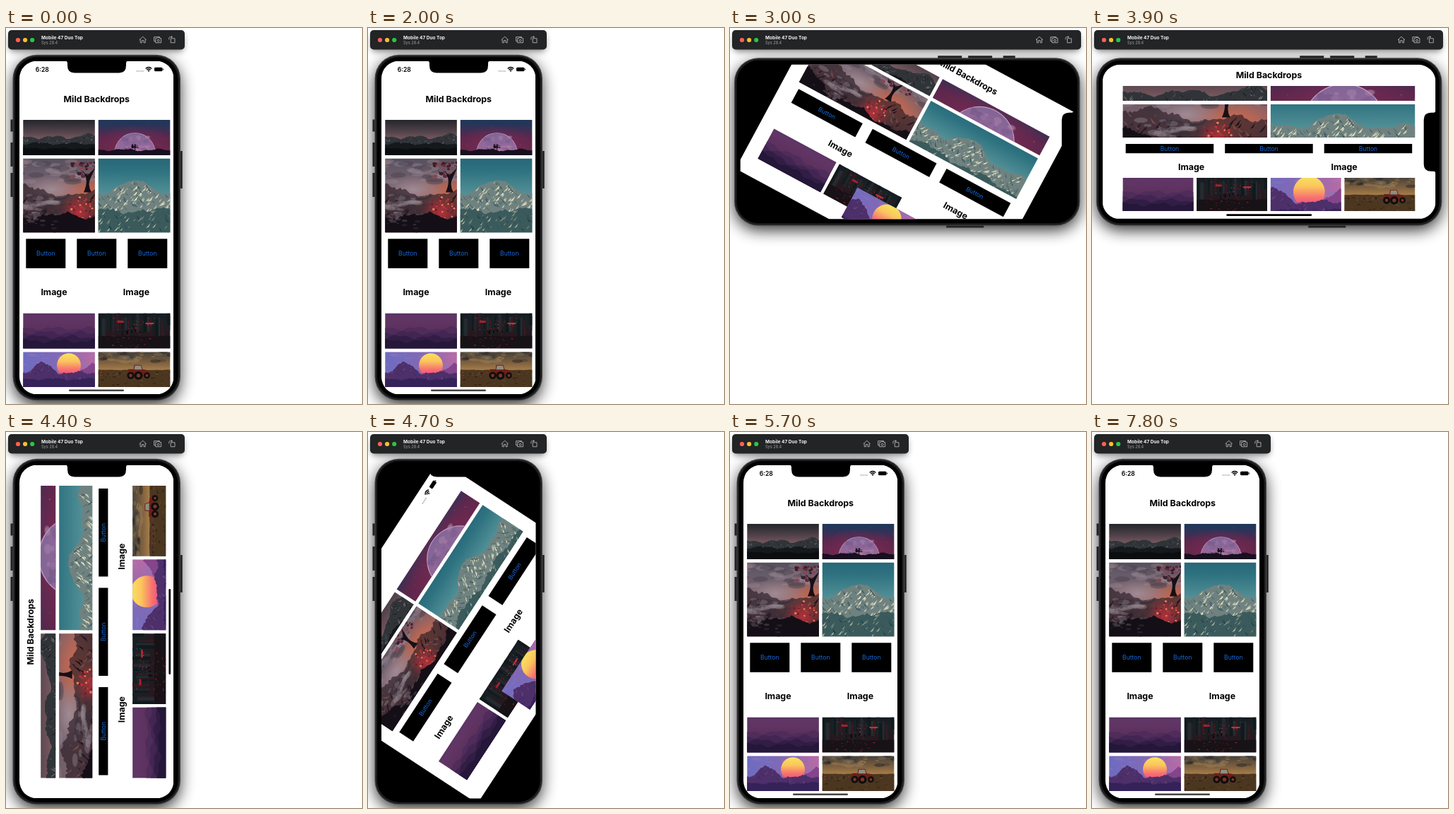
Animation, 504 px wide and 532 px high, one loop 8 s. Source, as an HTML page:

```html
<!DOCTYPE html>
<html lang="en">
<head>
<meta charset="utf-8">
<title>Rotating gallery</title>
<style>
html, body { margin: 0; width: 100%; height: 100%; overflow: hidden; background: #fff; }
svg { display: block; }
text { font-family: Inter, "Liberation Sans", sans-serif; }
.head { font-weight: 700; font-size: 12.4px; text-anchor: middle; }
.btn { font-size: 8.6px; fill: #1769d8; text-anchor: middle; }
</style>
</head>
<body>
<svg id="stage" width="504" height="532" viewBox="0 0 504 532">
  <defs>
    <filter id="soft" x="-30%" y="-30%" width="160%" height="160%"><feGaussianBlur stdDeviation="11"/></filter>
    <filter id="haze" x="-30%" y="-100%" width="160%" height="300%"><feGaussianBlur stdDeviation="5"/></filter>
    <clipPath id="screen"><rect x="19" y="46.5" width="218.5" height="472" rx="25"/></clipPath>
    <g id="defs"></g>
  </defs>
  <rect width="504" height="532" fill="#fff"/>
  <g transform="translate(0 7)" opacity=".82" filter="url(#soft)">
    <rect id="shade" x="10" y="38" width="236" height="489" rx="34"/>
  </g>
  <rect id="barShade" x="5" y="9" width="246" height="24" rx="5" opacity=".5" filter="url(#haze)"/>
  <rect id="bar" x="3" y="3" width="250" height="27.5" rx="5" fill="#222425"/>
  <g id="lights"></g>
  <text x="50" y="16" font-size="6.5" font-weight="700" fill="#f4f4f4">Mobile 47 Duo Top</text>
  <text x="50" y="23" font-size="5.6" fill="#a0a0a0">Sys 28.4</text>
  <g id="tools" fill="none" stroke="#b4b4b4" stroke-width=".9">
    <path d="M188.7 16.8 193.7 12.3 198.7 16.8M190.2 16V20.8H192.4V17.6H195V20.8H197.2V16"/>
    <path d="M211.7 18.8H209.6V12.7H217.6V14.2M211.7 14.6H213.5L214.3 13.6H217L217.8 14.6H219.6V20.8H211.7Z"/>
    <circle cx="215.7" cy="17.7" r="1.5"/>
    <path d="M233.2 14.8H239V20.8H233.2ZM230.8 16.4V14.4Q230.8 12.7 232.6 12.7H235.3M234 11.3 235.5 12.7 234 14.1"/>
  </g>
  <g id="device">
    <path d="M8.5 129.5v17M8.5 162v34M8.5 205v34M247.7 174v53" stroke="#222" stroke-width="4"/>
    <rect x="9.5" y="37.8" width="237.5" height="489.4" rx="34" fill="#4a4a4c"/>
    <rect x="10.6" y="38.9" width="235.3" height="487.2" rx="33" fill="#1d1d1f"/>
    <rect x="13" y="41.3" width="230.5" height="482.4" rx="31" fill="#000"/>
    <g clip-path="url(#screen)">
      <rect x="19" y="46" width="219" height="473" fill="#000"/>
      <g id="page"></g>
    </g>
    <path d="M83 46H174Q170 46.5 170 50V53Q170 63.5 160 63.5H97Q87 63.5 87 53V50Q87 46.5 83 46Z"/>
  </g>
</svg>
<script>
const LOOP = 8000, SPIN = 340;
const TO_SIDE = 2400, TURN_SIDE = 2788, TO_TALL = 4300, TURN_TALL = 4561;
const $ = id => document.getElementById(id);
const mix = (a, b, p) => a + (b - a) * p;
const random = s => () => (s = s * 16807 % 2147483647) / 2147483647;
const set = (el, o) => { for (const k in o) el.setAttribute(k, o[k]); };
const repeat = (n, f) => Array.from({ length: n }, (_, i) => f(i)).join('');
const n1 = v => v.toFixed(1);

// Drawing helpers; every scene is 102 by 57 units.
let defs = '', gradients = 0;
function grad(stops, kind = 'linear', attrs = 'x2="0" y2="1"') {
  const id = 'g' + gradients++;
  const s = stops.map((c, i) => `<stop offset="${i / (stops.length - 1)}" stop-color="${c}"/>`).join('');
  defs += `<${kind}Gradient id="${id}" ${attrs}>${s}</${kind}Gradient>`;
  return `url(#${id})`;
}
const box = (x, y, w, h, fill) => `<rect x="${n1(x)}" y="${n1(y)}" width="${n1(w)}" height="${n1(h)}" fill="${fill}"/>`;
const oval = (x, y, rx, ry, fill) => `<ellipse cx="${n1(x)}" cy="${n1(y)}" rx="${rx.toFixed(2)}" ry="${ry.toFixed(2)}" fill="${fill}"/>`;
const shape = (d, fill) => `<path d="${d}" fill="${fill}"/>`;
const backdrop = (...stops) => box(-40, -10, 180, 77, grad(stops));
const glow = (x, y, rx, ry, color) => oval(x, y, rx, ry, grad([color, color + '00'], 'radial', ''));

// A skyline: wavy level plus one triangular summit.
const skyline = (level, wave, seed, at = 0, rise = 0, spread = 1) => x =>
  level - wave * (Math.sin(x * .13 + seed) + .6 * Math.sin(x * .31 + seed * 2)) - rise * Math.max(0, 1 - Math.abs(x - at) / spread);
function ridge(line, fill, jag = 1) {
  const r = random(77);
  let d = 'M-40 67';
  for (let x = -40; x <= 140; x += 1.5) d += `L${x} ${n1(line(x) + (r() - .5) * jag)}`;
  return shape(d + 'V67Z', fill);
}
// Rock faces: even ones lean left, odd ones lean right.
function facets(n, line, depth, colors, size, seed) {
  const r = random(seed);
  return repeat(n, i => {
    const x = r() * 102, y = line(x) + r() * depth, h = size * (.5 + r()), w = h * (i % 2 ? .9 : -.9);
    return shape(`M${n1(x)} ${n1(y)}l${n1(w)} ${n1(h)}l${n1(-w * .6)} ${n1(-h * .2)}z`, colors[i % colors.length]);
  });
}
function specks(n, x, y, w, h, colors, size, seed, flat = 1) {
  const r = random(seed);
  return repeat(n, i => {
    const s = size * (.4 + r());
    return oval(x + r() * w, y + r() * h, s, s * flat, colors[i % colors.length]);
  });
}

function dusk() {
  const far = skyline(28, 1.8, 2, 90, 4, 20);
  return backdrop('#15181f', '#292930', '#54444b', '#8c626a', '#33343a', '#101214') +
    ridge(far, '#303438') + facets(90, far, 9, ['#77777b', '#1c2024', '#4b4d50'], 2.4, 31) +
    ridge(skyline(37, 1.3, 5), '#15191c', 1.5) + ridge(skyline(44, .8, 1), '#0b0e10');
}
function moon() {
  return backdrop('#1b3a55', '#24365a', '#5a264b', '#632748', '#3c1630') +
    glow(52, 40, 60, 30, '#7c2b55') + specks(60, 0, 0, 102, 42, ['#b98bb2', '#70527f', '#35547a'], .25, 12) +
    oval(52, 51, 29.4, 29.4, '#c39cc4') +
    oval(52, 51, 28.7, 28.7, grad(['#806596', '#94699a', '#b8608a', '#a84470'])) +
    specks(45, 32, 27, 40, 20, ['#6f588740', '#b48bb060', '#5f4a7850'], 3, 18, .7) +
    ridge(skyline(46, 1.2, 3), '#17101f') +
    specks(16, 48, 39, 8, 4, ['#1a0f1c'], 1.1, 4) + box(51.6, 41, .9, 7, '#120a14');
}
function lava() {
  const cliff = skyline(27, 2, 4, 12, 9, 30), rock = skyline(44, 2, 1, 4, 9, 26);
  return backdrop('#47414f', '#665b69', '#80636a', '#6a3d42', '#2a1a22') +
    glow(78, 30, 38, 22, '#d8694a') + glow(45, 24, 24, 12, '#a08a94') +
    specks(60, 0, 2, 102, 16, ['#8f859470', '#4a434f80', '#a88e9250'], 5, 22, .35) +
    ridge(cliff, '#2d2129b0', 2) + facets(110, cliff, 26, ['#191218', '#44323a', '#241a21', '#7a4a48'], 4, 14) +
    specks(50, 12, 28, 46, 18, ['#8c849060', '#3a2f3a90', '#aaa0a650'], 4, 27, .4) +
    glow(66, 42, 15, 14, '#b3303a') + specks(40, 57, 29, 20, 22, ['#c9323c', '#6f1f2b', '#ee7a54'], .7, 41) +
    specks(60, 61, 3, 26, 12, ['#5c2a3c', '#8c4552', '#35202c'], 1.4, 8, .7) +
    shape('M70 26Q75 15 68 9L73 13 79 7 75 16Q73 21 76 26Z', '#171016') +
    ridge(rock, '#140f16', 1.6) + specks(30, 4, 42, 45, 12, ['#3c314070', '#6a5c6670'], 2, 35, .4);
}
function peak() {
  const top = skyline(26, 1.4, 1, 51, 9, 24), foot = skyline(40, 1.6, 5);
  return backdrop('#215a70', '#2e7280', '#559298', '#93b9aa', '#9bbfaf') +
    ridge(top, '#6f8280') + facets(260, top, 18, ['#e4dfbe', '#3f5c63', '#cdcaae', '#55706f'], 3.2, 44) +
    ridge(foot, '#3b5a5c', 2) + facets(120, foot, 15, ['#b9bda0', '#1d424b', '#7a8c7e', '#2c5259'], 3, 51);
}
function hills() {
  return backdrop('#4a2e5c', '#613666', '#5c305c', '#32204a', '#1d1434') +
    ['#4f2c5a', '#422553', '#321d45', '#241739'].map((c, i) => ridge(skyline(25 + i * 6, 2, 2 + i * 1.7), c, .6)).join('');
}
function street() {
  const r = random(63), tones = ['#10191c', '#222c31', '#351a20', '#162225'];
  return backdrop('#0e1519', '#1c2026', '#28161b', '#100d11') +
    repeat(26, i => box(i * 4 + r() * 2, r() * 14, 1 + r() * 4, 18 + r() * 15, tones[i % 4])) +
    specks(60, 20, 9, 62, 20, ['#a51e2b', '#df3640', '#5f1620', '#396064'], .6, 71, .7) +
    box(27, 14, 9, 3, '#aa1f2d') + box(67, 17, 12, 2, '#d32c3a') +
    ridge(skyline(36, .5, 2), '#171216') + specks(50, 14, 34, 60, 20, ['#6c1522', '#a92231', '#331018'], 1.2, 15, .35) +
    specks(9, 39, 27, 30, 4, ['#08090c'], .9, 29, 2.6);
}
function sunset() {
  const near = skyline(33, 1.5, 4, 27, 15, 24);
  return box(-40, -10, 180, 77, grad(['#5560b8', '#6f6cc0', '#8169b5', '#b16ba6', '#c7719c'], 'linear', '')) +
    specks(24, 0, 4, 102, 22, ['#7b78c870', '#a877b770'], 6, 19, .2) +
    oval(65, 22.5, 17, 17, grad(['#f8e35d', '#fbc45e', '#f7736f', '#ee3f86'])) +
    ridge(skyline(35, 1.5, 1, 98, 14, 28), '#84458a') +
    ridge(near, '#4d2f69', 1.8) + facets(40, near, 12, ['#67417f', '#3d265c'], 4, 23) + ridge(skyline(42, 1.2, 2), '#352258', 1.6);
}
function field() {
  const wheel = (x, s) => oval(x, 37, s, s, '#0f0e0e') + oval(x, 37, s * .45, s * .45, '#7a3429');
  return backdrop('#2c2927', '#4d443b', '#856541', '#c2914f', '#4a3723', '#21180f') +
    specks(80, -25, -2, 150, 20, ['#3d393670', '#80705a70', '#24232380', '#b08a5560'], 6, 33, .35) +
    ridge(skyline(29, .2, 1), '#4b3720', .4) + specks(110, -30, 31, 150, 26, ['#2a1d12', '#6b4b28', '#3a2815'], 2, 46, .25) +
    specks(40, -18, 32.5, 56, 3, ['#31211d', '#823b39', '#5b2d2a'], .9, 55) +
    shape('M42 28H50L51 22H61L63 28 71 30V37H43Z', '#6b1f19') + shape('M52 23H60.5L62 28.5H51Z', '#8d8f84') +
    wheel(46, 5.2) + wheel(57, 6) + wheel(69, 4.4);
}

// Two layouts, measured from the top left of the page.
const tall = { w: 218, h: 471, left: 5.3, inner: 208, tops: [83, 137.7, 251.3, 356.7, 411.4], heights: [50, 104.6, 41.6, 49.6, 49.6], title: 57.6, label: 331.3, lower: 2 };
const wide = { w: 471, h: 218, left: 28.5, inner: 413.5, tops: [30.2, 56.2, 112.2, 160.2], heights: [21, 47, 13.2, 47], title: 19.6, label: 149.4, lower: 4 };
function cell(v, row, col, cols, gap = 4.9, inset = 0) {
  const width = (v.inner - 2 * inset - gap * (cols - 1)) / cols;
  return [v.left + inset + col * (width + gap), v.tops[row], width, v.heights[row]];
}
const picture = (v, i) => i < 4 ? cell(v, i >> 1, i % 2, 2) : cell(v, 3 + Math.floor((i - 4) / v.lower), (i - 4) % v.lower, v.lower);
const button = (v, i) => cell(v, 2, i, 3, 16, 4);
const label = (v, i) => i ? [v.left + v.inner * (i == 1 ? .21 : .77) - (v == wide ? 5 : 0) * (i == 1 ? -2 : 1), v.label] : [v.left + v.inner / 2, v.title];

const scenes = [dusk, moon, lava, peak, hills, street, sunset, field];
// Scene shift [x, y, scale] when sideways
const shifts = new Map([[peak, [-5, 6.4, 1]], [sunset, [-32, -5.4, 1.35]], [field, [15, 0, 1]]]);

$('lights').innerHTML = ['#ff5f57', '#febc2e', '#28c840'].map((c, i) => oval(17 + i * 10.1, 17, 3.1, 3.1, c)).join('');
$('page').innerHTML = '<rect id="paper" fill="#fff"/>' +
  scenes.map(draw => `<svg class="pic" viewBox="0 0 102 57" preserveAspectRatio="xMidYMid slice" overflow="hidden"><g>${draw()}</g></svg>`).join('') +
  repeat(3, () => '<rect class="pad"/><text class="btn">Button</text>') +
  ['Mild Backdrops', 'Image', 'Image'].map(s => `<text class="head">${s}</text>`).join('') +
  `<g id="status"><text id="clock" y="15" font-size="8.6" font-weight="600" text-anchor="middle">6:28</text>
   <g id="signals">${repeat(4, i => oval(-51.3 + i * 2.7, 14, .75, .75, '#777'))}
   <path d="M-39.3 10.5Q-35 6.7-30.7 10.5M-37.7 12.2Q-35 9.8-32.3 12.2" fill="none" stroke="#000" stroke-width="1.4"/><path d="M-36.5 13.2Q-35 12-33.5 13.2L-35 14.9Z"/>
   <rect x="-27" y="8.7" width="11.5" height="5.6" rx="1.5"/><rect x="-15" y="10.4" width="1" height="2.2" rx=".5"/></g></g>
   <rect id="grip" height="2.7" rx="1.35"/>`;
$('defs').innerHTML = defs;

const all = c => [...document.querySelectorAll(c)];
const pics = all('.pic'), pads = all('.pad'), captions = all('.btn'), heads = all('.head');
const between = (f, i, p) => { const b = f(wide, i); return f(tall, i).map((v, k) => mix(v, b[k], p)); };
const ease = (t, start) => { const k = Math.min(1, Math.max(0, (t - start) / SPIN)); return k * k * (3 - 2 * k); };

function render(t) {
  const side = t >= TO_SIDE && t < TO_TALL;
  const p = t < TO_TALL ? ease(t, TURN_SIDE) : 1 - ease(t, TURN_TALL);
  const laidWide = t >= TURN_SIDE && t < TURN_TALL;
  const w = mix(tall.w, wide.w, p), h = mix(tall.h, wide.h, p);
  const transform = side ? 'matrix(0 1 -1 0 533.2 32.8)' : '';

  set($('device'), { transform });
  set($('shade'), { transform });
  set($('bar'), { width: side ? 494 : 250 });
  set($('barShade'), { width: side ? 490 : 246 });
  set($('tools'), { transform: `translate(${side ? 244.3 : 0} 0)` });
  set($('page'), { transform: `translate(128 282.5) rotate(${-90 * p}) translate(${-w / 2} ${-h / 2})` });
  set($('paper'), { width: w, height: h });

  scenes.forEach((draw, i) => {
    const [x, y, width, height] = between(picture, i, p);
    const [dx, dy, zoom] = shifts.get(draw) || [0, 0, 1];
    set(pics[i], { x, y, width, height });
    set(pics[i].firstChild, { transform: `translate(${dx * p} ${dy * p}) scale(${mix(1, zoom, p)})` });
  });
  pads.forEach((pad, i) => {
    const [x, y, width, height] = between(button, i, p);
    set(pad, { x, y, width, height });
    set(captions[i], { x: x + width / 2, y: y + height / 2 + 3.1 });
  });
  // Label text is laid out for the final width and stays at the left of its moving frame.
  heads.forEach((head, i) => {
    const [x, y] = between(label, i, p);
    const grow = (wide.inner - tall.inner) / (i ? 4 : 2);
    set(head, { x: x + grow * (laidWide ? 1 - p : -p), y });
  });
  set($('status'), { opacity: laidWide ? 0 : 1 });
  set($('clock'), { x: 32.3 + 21 * p });
  set($('signals'), { transform: `translate(${w - 21 * p} 0)` });
  const grip = mix(78, 121, p);
  set($('grip'), { x: w / 2 - grip / 2, y: h - 6.6, width: grip, fill: laidWide ? '#000' : '#444', opacity: p % 1 ? 0 : 1 });
}

const begin = performance.now();
function tick() {
  render((performance.now() - begin) % LOOP);
  requestAnimationFrame(tick);
}
tick();
</script>
</body>
</html>
```
